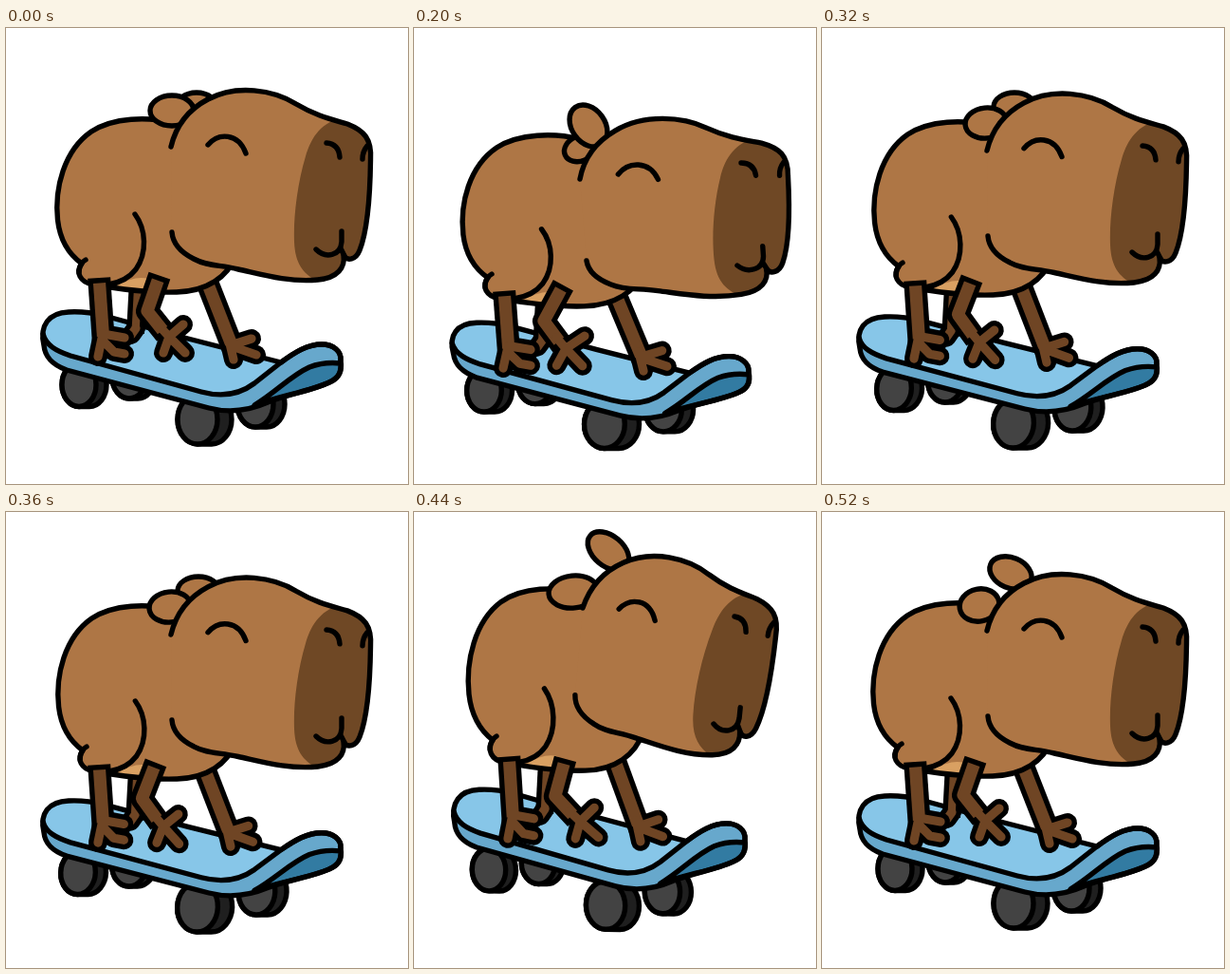
Write an HTML page with a canvas that moves like this. It is 424x480 px and loops after 0.6 s.

```html
<!DOCTYPE html>
<html lang="en">
<head>
<meta charset="utf-8">
<title>Skating capybara</title>
<style>
html, body { margin: 0; width: 100%; height: 100%; overflow: hidden; background: #fff; }
canvas { display: block; width: 424px; height: 480px; }
</style>
</head>
<body>
<canvas id="stage" width="424" height="480"></canvas>
<script>
const ctx = document.getElementById('stage').getContext('2d');
const FUR = '#ae7645', MUZZLE = '#6f4825', LEG = '#6f4524';
const LINE = 5.4;

// Three anchor points (x, y each) per part and pose; each part follows them affinely.
const anchors = {
  head: {
    mid:  [174, 125, 338, 121, 327, 233],
    sink: [174, 138, 340, 129, 331, 243],
    low:  [175, 159, 345, 142, 341, 250],
    rise: [174, 129, 338, 124, 327, 236],
    high: [178, 101, 338, 110, 316, 223]
  },
  body: {
    mid:  [130, 96, 84, 244, 215, 272],
    sink: [129, 104, 82, 250, 215, 279],
    low:  [128, 113, 82, 259, 215, 287],
    rise: [130, 99, 85, 247, 215, 275],
    high: [131, 81, 87, 236, 215, 266]
  },
  legs: {
    mid:  [99, 268, 95, 349, 238, 352],
    sink: [97, 274, 93, 353, 238, 355],
    low:  [96, 282, 92, 361, 240, 364],
    rise: [99, 271, 95, 351, 235, 355],
    high: [101, 262, 97, 347, 237, 350]
  },
  paw: {
    mid:  [160, 266, 163, 341, 189, 308],
    sink: [158, 270, 154, 348, 184, 314],
    low:  [155, 275, 147, 354, 183, 320],
    rise: [156, 269, 156, 347, 184, 314],
    high: [158, 265, 167, 343, 192, 307]
  },
  board: {
    mid:  [38, 318, 235, 402, 355, 350],
    sink: [35, 322, 235, 403, 357, 354],
    low:  [39, 328, 238, 410, 355, 362],
    rise: [38, 322, 235, 403, 355, 354],
    high: [41, 311, 233, 396, 351, 345]
  },
  wheels: {
    mid:  [77, 377, 135, 375, 208, 417],
    sink: [74, 381, 133, 379, 207, 420],
    low:  [74, 383, 133, 381, 207, 422],
    rise: [76, 381, 135, 379, 208, 421],
    high: [79, 378, 136, 377, 208, 419]
  }
};

// Ellipses: cx, cy, rx, ry, rotation
const ears = {
  near: {
    mid: [175, 87, 23, 16, 0], sink: [175, 94, 24, 16, .35],
    low: [184, 103, 24, 17.5, .95], rise: [173, 100, 22, 16, -.1],
    high: [168, 84, 26, 17, -.1], settle: [166, 98, 21, 17, -.2]
  },
  far: {
    mid: [201, 85, 22, 17, 0], sink: [194, 95, 19, 14, .3],
    low: [175, 127, 17, 13, -.4], rise: [203, 83, 22, 15, 0],
    high: [205, 41, 25, 16, .7], settle: [199, 64, 23, 16, .4]
  }
};

// Ten poses per second, shown on a 25 fps grid
const poses = ['mid', 'sink', 'low', 'rise', 'high', 'settle'];
const TICK = 40, HOLD = 100;

function poseOf(part, pose) {
  return part[pose] || part.mid;
}

function basis([ax, ay, bx, by, cx, cy]) {
  return new DOMMatrix([bx - ax, by - ay, cx - ax, cy - ay, ax, ay]);
}

function mapper(name, pose) {
  const part = anchors[name];
  const matrix = basis(poseOf(part, pose)).multiply(basis(part.mid).inverse());
  return d => {
    const path = new Path2D();
    path.addPath(new Path2D(d), matrix);
    return path;
  };
}

function fill(path, color) {
  ctx.fillStyle = color;
  ctx.fill(path);
}

function stroke(path, width = LINE, color = '#000', cap = 'round') {
  ctx.lineWidth = width;
  ctx.strokeStyle = color;
  ctx.lineCap = cap;
  ctx.stroke(path);
}

function shape(path, color) {
  fill(path, color);
  stroke(path);
}

// Square caps keep the border even along the flat top of a leg.
function limb(leg, toes, thick = 24) {
  stroke(leg, thick, '#000', 'square');
  stroke(toes, 20);
  stroke(leg, thick - 2 * LINE, LEG, 'square');
  stroke(toes, 20 - 2 * LINE, LEG);
}

function drawWheels(pose) {
  const at = mapper('wheels', pose);
  const wheel = (x, y, rx, ry, depth) => {
    const arc = `a${rx} ${ry} 0 0 1 0 `;
    shape(at(`M${x} ${y - ry}h${depth}${arc}${2 * ry}h${-depth}${arc}${-2 * ry}Z`), '#1f1f1f');
    shape(at(`M${x} ${y - ry}${arc}${2 * ry}${arc}${-2 * ry}Z`), '#434343');
  };
  wheel(130, 368, 18, 22, 9);
  wheel(263, 396, 19, 24, 12);
  wheel(77, 375.5, 18, 23, 11);
  wheel(202, 412, 21, 26, 15);
}

function drawBoard(pose) {
  const at = mapper('board', pose);
  const nose = 'C305 341 318 333 333 333C345 333 354 340 353 350';
  const rim = 'M39 322C42 334 53 340 68 345L206 383C228 389 246 386 262 374L290 352';
  const outline = at('M66 299C82 298 92 300 104 303L192 327L290 352' + nose
    + 'C355 362 351 368 341 373C322 382 299 385 276 394C258 402 237 406 214 400L64 360C48 354 41 346 40 334C35 313 45 300 66 299Z');
  fill(outline, '#67a8cc');
  fill(at(rim + 'L192 327L104 303C92 300 82 298 66 299C48 299 39 310 39 322Z'), '#87c6e8');
  shape(at('M262 397C284 384 300 366 320 357C333 352 344 352 353 353C354 364 349 370 341 373C322 382 290 387 262 397Z'), '#327ba2');
  stroke(at(rim + nose));
  stroke(outline);
}

function drawBody(pose) {
  const at = mapper('body', pose);
  const outline = at('M176 100C150 93 113 94 90 109C61 129 51 169 54.5 202C57 224 66 238 80 248C73 257 78 268 92 270C120 275 150 279 180 278C212 277 234 262 242 240');
  fill(outline, FUR);
  fill(at('M116 272Q136 260 150 264L150 277Z'), '#d9a062');
  stroke(outline);
  stroke(at('M136 196C148 212 149 237 137 254Q127 267 108 270'));
  stroke(at('M84 244Q77 248 77 257'));
}

function drawEar(side, pose) {
  const [x, y, rx, ry, turn] = poseOf(ears[side], pose);
  const ear = new Path2D();
  ear.ellipse(x, y, rx, ry, turn, 0, 2 * Math.PI);
  shape(ear, FUR);
}

function drawHead(pose) {
  const at = mapper('head', pose);
  const outline = at('M174 125C179 104 192 86 213 75C243 59 282 65 306 80C328 93 343 96 360 101C378 108 386 117 384.5 139C384 178 381 214 373 234C369 244 360 246 356 239C358 252 350 263 329 265C298 268 268 259 245 254C224 249 213 251 198 243C184 236 176 227 175 215');
  fill(outline, FUR);
  ctx.save();
  ctx.clip(outline);
  fill(at('M352 95C330 101 321 118 316 135C307 165 303 200 304 225C305 250 315 260 331 268L400 270V95Z'), MUZZLE);
  ctx.restore();
  stroke(outline);
  stroke(at('M213 123C224 110 245 110 253 132'));
  stroke(at('M338 121Q351 122 352 136M381 124Q376 130 376 138'));
  stroke(at('M327 233C337 243 353 240 354 225V214M353 232L357 240'));
}

function draw(pose) {
  ctx.fillStyle = '#fff';
  ctx.fillRect(0, 0, 424, 480);
  ctx.lineJoin = 'round';
  drawWheels(pose);
  drawBoard(pose);
  const legs = mapper('legs', pose), paw = mapper('paw', pose);
  limb(legs('M139 275L137 312'), legs('M137 316L132 323'), 19);
  limb(legs('M215 275L235 326'), legs('M235 328L240 349M238 335L264 344M240 333L259 327'));
  drawBody(pose);
  limb(legs('M99 275L102 318'), legs('M102 322L97 346M103 330L114 341L125 343M108 323L125 326'));
  limb(paw('M158 272L149 298L161 313'), paw('M162 314L172 325L187 312M172 325L166 342M172 325L189 342'));
  drawEar('far', pose);
  drawEar('near', pose);
  drawHead(pose);
}

function tick() {
  const time = Math.floor(performance.now() % 600 / TICK) * TICK;
  draw(poses[Math.floor(time / HOLD)]);
  requestAnimationFrame(tick);
}
tick();
</script>
</body>
</html>
```
